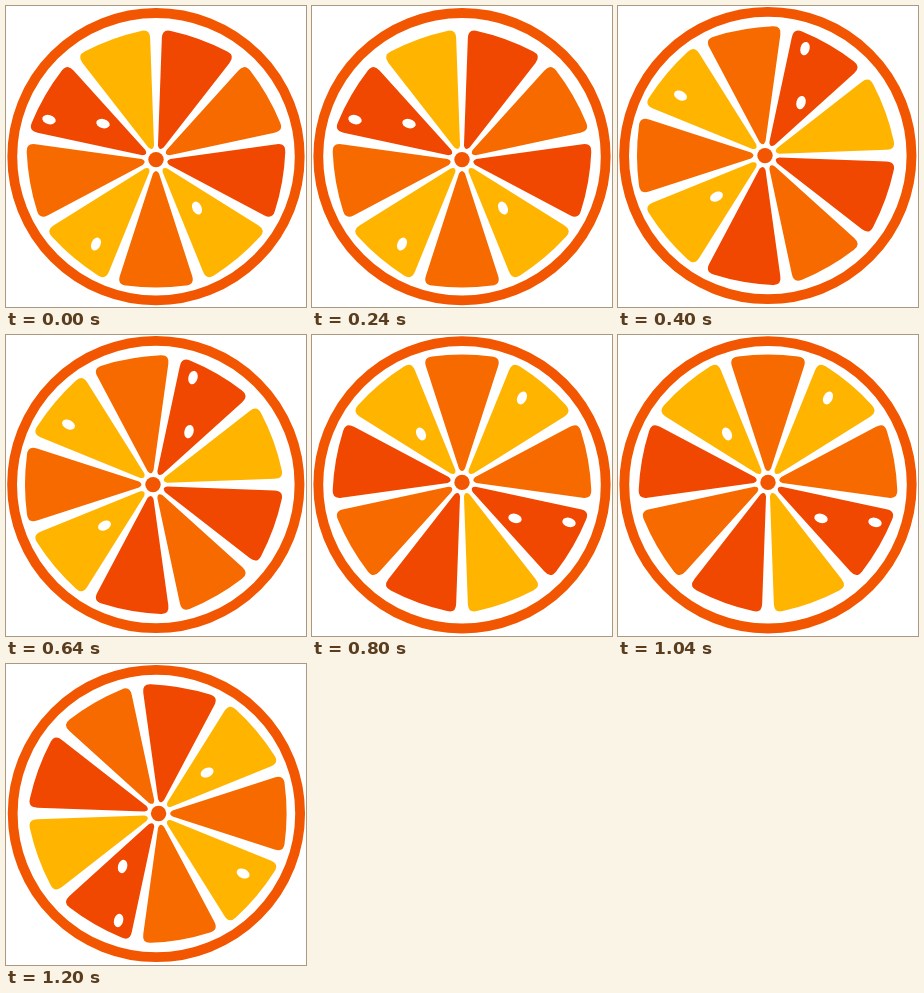
An HTML page for the animation above (1600 ms loop, 300 px wide and 301 px high).

```html
<!DOCTYPE html>
<html lang="en">
<head>
<meta charset="utf-8">
<title>Orange slice</title>
<style>
html, body { margin: 0; width: 100%; height: 100%; overflow: hidden; background: #fff; }
svg { display: block; width: 100%; height: 100%; }
</style>
</head>
<body>
<svg id="stage" viewBox="0 0 300 301"></svg>
<script>
const NS = 'http://www.w3.org/2000/svg';
const RIND = '#f25600', RED = '#f04800', ORANGE = '#f66a00', YELLOW = '#ffb400';
const STEP = 400;
const WEDGE = 'M-3-14Q0-9 3-14L36-116Q39-125 30-126Q0-130-30-126Q-39-125-36-116Z';

function add(parent, tag, attrs) {
  const el = document.createElementNS(NS, tag);
  for (const k in attrs) el.setAttribute(k, attrs[k]);
  return parent.appendChild(el);
}

const stage = document.getElementById('stage');
const disc = add(stage, 'circle', { r: 143.7, fill: '#fff', stroke: RIND, 'stroke-width': 9.8 });
const slice = add(stage, 'g', {});

// Segments clockwise, the first one just right of the top
[RED, ORANGE, RED, YELLOW, ORANGE, YELLOW, ORANGE, RED, YELLOW].forEach((fill, i) =>
  add(slice, 'path', { d: WEDGE, fill, transform: `rotate(${20 + 40 * i})` }));

// Seeds: x, y, tilt
[[41, 48.5, 65], [-60, 84.5, 115], [-107, -40, 15], [-53, -36, 15]].forEach(([x, y, a]) =>
  add(slice, 'ellipse', { rx: 6.8, ry: 4.6, fill: '#fff', transform: `translate(${x} ${y}) rotate(${a})` }));

add(slice, 'circle', { r: 7.7, fill: RIND });

// Centres of rind and hub for each quarter turn
const rind = [[150, 150.7], [149.8, 149.5], [150, 149.8], [150.4, 149.5]];
const hub = [[150, 153.6], [147, 149.6], [150, 147.4], [152.6, 149.5]];

function draw(ms) {
  const n = Math.floor(ms / STEP) % 4;
  disc.setAttribute('transform', `translate(${rind[n]})`);
  slice.setAttribute('transform', `translate(${hub[n]}) rotate(${90 * n})`);
}

let start;
function tick(now) {
  start ??= now;
  draw(now - start);
  requestAnimationFrame(tick);
}
draw(0);
requestAnimationFrame(tick);
</script>
</body>
</html>
```
